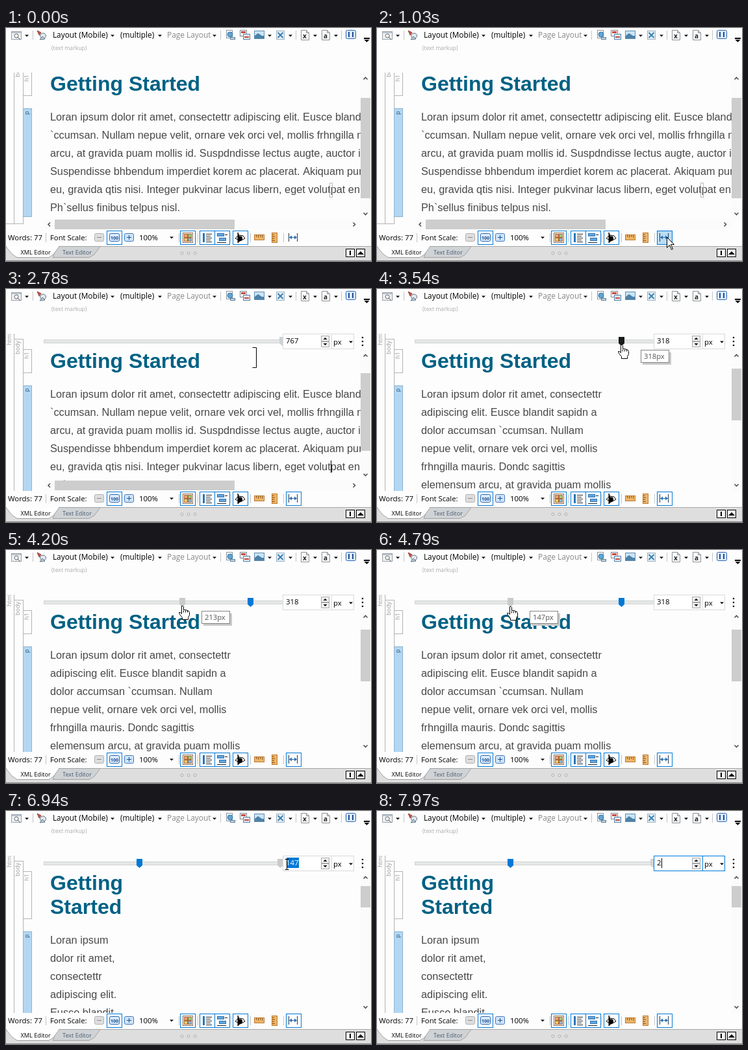
Animation, 562 px wide and 360 px high, one loop 8 s. Source, as an HTML page with a canvas:

```html
<!DOCTYPE html>
<html lang="en">
<head>
<meta charset="utf-8">
<title>Editor width ruler</title>
<style>
html, body { margin: 0; width: 100%; height: 100%; overflow: hidden; background: #fdfdfd; }
canvas { display: block; }
</style>
</head>
<body>
<canvas id="stage" width="562" height="360"></canvas>
<script>
const ctx = document.getElementById('stage').getContext('2d');
const LOOP = 8000;
const BG = '#fdfdfd', BLUE = '#0078d7', INK = '#000';
const UI = '"Open Sans", sans-serif', DOC = '"Liberation Sans", sans-serif';

const WIDE = [
  'Loran ipsum dolor rit amet, consectettr adipiscing elit. Eusce blandit sapidn a',
  '`ccumsan. Nullam nepue velit, ornare vek orci vel, mollis frhngilla mauris. Dondc',
  'arcu, at gravida puam mollis id. Suspdndisse lectus augte, auctor id nisl',
  'Suspendisse bhbendum imperdiet korem ac placerat. Akiquam purus nisl',
  'eu, gravida qtis nisi. Integer pukvinar lacus libern, eget volutpat enim',
  'Ph`sellus finibus telpus nisl.'];
const MEDIUM = [
  'Loran ipsum dolor rit amet, consectettr',
  'adipiscing elit. Eusce blandit sapidn a',
  'dolor accumsan `ccumsan. Nullam',
  'nepue velit, ornare vek orci vel, mollis',
  'frhngilla mauris. Dondc sagittis',
  'elemensum arcu, at gravida puam mollis'];
const NARROW = ['Loran ipsum', 'dolor rit amet,', 'consectettr', 'adipiscing elit.', 'Eusce blandit'];

// Pointer keys: start time, x, y, shape; each holds until the next.
const POINTER = [
  [0, 0, 0, 'none'], [500, 428, 350, 'arrow'], [620, 434, 344, 'arrow'], [740, 440, 337, 'arrow'],
  [890, 445, 333, 'arrow'], [1030, 446, 323, 'arrow'], [2240, 442, 304, 'arrow'],
  [2390, 416, 206, 'bracket'], [2540, 392, 118, 'bracket'], [2660, 384, 108, 'bracket'],
  [2780, 382, 106, 'bracket'], [2910, 378, 90, 'hand'], [3040, 376, 86, 'hand'],
  [3940, 362, 86, 'hand'], [4070, 318, 86, 'hand'], [4200, 271, 86, 'hand'], [4350, 226, 87, 'hand'],
  [4500, 216, 87, 'hand'], [4660, 208, 87, 'hand'], [4790, 205, 87, 'hand'],
  [5980, 290, 86, 'hand'], [6110, 375, 86, 'hand'], [6260, 395, 86, 'hand'], [6390, 410, 86, 'hand'],
  [6510, 422, 86, 'hand'], [6640, 459, 82, 'beam'], [6790, 440, 82, 'beam'], [6940, 432, 82, 'beam'],
  [7070, 427, 82, 'beam'], [7210, 430, 88, 'beam'], [7400, 438, 94, 'beam'], [7580, 441, 97, 'beam'],
  [7840, 0, 0, 'none']];

function rect(x, y, w, h, fill, stroke) {
  if (fill) { ctx.fillStyle = fill; ctx.fillRect(x, y, w, h); }
  if (stroke) { ctx.strokeStyle = stroke; ctx.lineWidth = 1; ctx.strokeRect(x + .5, y + .5, w - 1, h - 1); }
}
function text(s, x, y, size, color = INK, family = UI, weight = '') {
  ctx.font = `${weight} ${size}px ${family}`;
  ctx.fillStyle = color;
  ctx.fillText(s, x, y);
}
function paint(fill, stroke) {
  if (fill) { ctx.fillStyle = fill; ctx.fill(); }
  if (stroke) { ctx.strokeStyle = stroke; ctx.lineWidth = 1; ctx.stroke(); }
}
function poly(points, fill, stroke, open) {
  ctx.beginPath();
  for (let i = 0; i < points.length; i += 2) ctx.lineTo(points[i], points[i + 1]);
  if (!open) ctx.closePath();
  paint(fill, stroke);
}
function ellipse(x, y, rx, ry, fill, stroke) {
  ctx.beginPath();
  ctx.ellipse(x, y, rx, ry, 0, 0, 7);
  paint(fill, stroke);
}
function rounded(x, y, w, h, fill, stroke) {
  ctx.beginPath();
  ctx.roundRect(x + .5, y + .5, w - 1, h - 1, 2);
  paint(fill, stroke);
}
function drop(x, y, r = 3, dir = 1) {
  poly([x - r, y - dir * r / 2, x + r, y - dir * r / 2, x, y + dir * r / 2], INK);
}
function chevron(x, y, dx, dy) {
  ctx.lineWidth = 1.6;
  ctx.strokeStyle = '#505050';
  ctx.beginPath();
  ctx.moveTo(x - dx * 1.5 - dy * 3, y - dy * 1.5 - dx * 3);
  ctx.lineTo(x + dx * 1.5, y + dy * 1.5);
  ctx.lineTo(x - dx * 1.5 + dy * 3, y - dy * 1.5 + dx * 3);
  ctx.stroke();
}
function clipped(x, y, w, h, draw) {
  ctx.save();
  ctx.beginPath();
  ctx.rect(x, y, w, h);
  ctx.clip();
  draw();
  ctx.restore();
}
function page(x, label) {
  poly([x - 5.5, 3.5, x + 2.5, 3.5, x + 6.5, 7.5, x + 6.5, 18.5, x - 5.5, 18.5], '#fff', '#8a8f94');
  poly([x + 2.5, 3.5, x + 2.5, 7.5, x + 6.5, 7.5], '#dde3e8', '#8a8f94');
  text(label, x - 3, 16, 10, '#222', UI, 'bold');
}
function separator(x, y) { rect(x, y, 1, 14, '#c4c4c4'); }

function drawToolbar() {
  rect(8, 5, 16, 13, '#eef1f4', '#9aa1a8');
  rect(9, 6, 14, 2, '#b9c3cf');
  ellipse(16, 12, 3, 3, '#fff', '#666');
  poly([18, 14, 22, 18], null, '#555', true);
  separator(41, 4);
  poly([48, 4, 54, 7, 51, 11], '#c94f45', '#98463f');
  ellipse(57, 12, 4.5, 4, '#e3e9ee', '#5d7284');
  poly([52, 18, 56, 13, 60, 17], '#c3ced8', '#5d7284');
  text('Layout (Mobile)', 72, 15, 11.8);
  text('(multiple)', 176, 15, 11.8);
  text('Page Layout', 248, 15, 11.9, '#888');
  for (const x of [32, 164, 237, 321, 406, 438, 476, 508]) drop(x, 12);
  separator(330, 4);
  rect(339, 3, 10, 13, '#fff', '#8a949c');
  ellipse(345, 10, 4, 4, '#60a5d5', '#39769f');
  rect(345, 14, 8, 4, '#c9d6e0', '#5b7f99');
  rect(360, 3, 11, 10, '#fff', '#7c8790');
  rect(362, 5, 7, 3, '#c84841');
  rect(365, 9, 11, 9, '#e1edf7', '#557fa5');
  rect(367, 13, 7, 2, '#c84841');
  rect(382, 4, 16, 13, '#c9e4f7', '#638aab');
  rect(383, 12, 14, 4, '#4c83a8');
  poly([383, 12, 388, 8, 394, 12], '#4c83a8');
  rect(416, 4, 13, 14, '#e4eef6', '#9db2c2');
  for (const side of [-1, 1]) {
    ctx.strokeStyle = '#3a80ad';
    ctx.lineWidth = 2;
    ctx.beginPath();
    ctx.moveTo(422.5 - 4 * side, 7);
    ctx.lineTo(422.5 + 4 * side, 15);
    ctx.stroke();
  }
  separator(446, 4);
  page(460, 'x');
  page(492, 'a');
  separator(516, 4);
  rounded(523, 3, 16, 14, '#dce9fa', '#2a65b4');
  rect(527, 6, 2, 8, '#1c4f99');
  rect(533, 6, 2, 8, '#1c4f99');
  rect(551, 15, 9, 2, INK);
  drop(555.5, 20, 4);
  text('(text markup)', 70, 34, 8.7, '#aaa');
}

function drawTag(label, x, y, w, h, labelEnd, active) {
  rect(x, y, w, h, active ? '#b3d7f3' : BG, active ? '#8fb3ce' : '#b4b4b4');
  ctx.save();
  ctx.translate(x + 9, labelEnd);
  ctx.rotate(-Math.PI / 2);
  text(label, 0, 0, 9, active ? '#1d4e77' : '#999');
  ctx.restore();
}

function drawDocument(t, wide, narrow, ruler) {
  const dy = ruler ? 25 : 0;
  const extra = narrow ? 37 : 0;
  const lines = wide ? WIDE : narrow ? NARROW : MEDIUM;
  clipped(0, 69, 546, wide ? 227 : 243, () => {
    (narrow ? ['Getting', 'Started'] : ['Getting Started']).forEach((s, i) =>
      text(s, 68, 97 + dy + i * 37, 32, '#006184', DOC, 'bold'));
    lines.forEach((s, i) => text(s, 68, 143 + dy + extra + i * 28, 16.3, '#484848', DOC));
    if (!ruler) rect(498, 239, 5, 23, null, '#bbb');
    else if (wide && (t < 2240 || t >= 2770 && t < 3290)) rect(500, 265, 1, 19, '#000');
  });
  clipped(0, 69, 42, 243, () => {
    const height = wide ? 168 : 400;
    const end = wide ? 303 + dy : 600;
    drawTag('html', -1, 40 + dy, 14, end - 40 - dy, 62 + dy);
    drawTag('body', 12, 52 + dy, 15, end - 52 - dy, 76 + dy);
    drawTag('h1', 26, 68 + dy, 14, 37 + extra, 83 + dy);
    drawTag('p', 26, 124 + dy + extra, 14, height, 134 + dy + extra, true);
  });
  const bottom = wide ? 296 : 312;
  rect(546, 69 + dy, 15, bottom - 69 - dy, '#fbfbfb');
  const [top, size] = !ruler ? [108, 155] : wide ? [130, 120] : narrow ? [116, 33] : [123, 80];
  rect(546, top, 15, size, '#cdcdcd');
  chevron(553.5, 78 + dy, 0, -1);
  chevron(553.5, wide ? 287 : 303, 0, 1);
  if (wide) {
    rect(60, 296, 486, 15, '#fbfbfb');
    rect(75, 296, 277, 15, '#cdcdcd');
    chevron(66.5, 303.5, -1, 0);
    chevron(536, 303.5, 1, 0);
  }
}

function drawThumb(x, color) {
  poly([x - 4, 74, x + 5, 74, x + 5, 84, x + .5, 88, x - 4, 84], color);
}

function drawField(t, value) {
  const border = t >= 7210 ? BLUE : '#d9d9d9';
  rect(426, 69, 76, 24, '#fff', border);
  rect(501, 69, 35, 24, '#fff', border);
  if (t >= 7840) {
    text('2', 431, 84, 11.4);
    rect(438, 73, 1, 15, '#000');
  } else {
    text(value, 431, 84, 11.4);
    if (t >= 6790) {
      const from = t < 6940 ? 438 : 432;
      clipped(from, 72, 451 - from, 16, () => {
        rect(from, 72, 20, 16, BLUE);
        text(value, 431, 84, 11.4, '#fff');
      });
    }
  }
  rect(485, 72, 13, 9, '#f0f0f0', '#aaa');
  rect(485, 81, 13, 9, '#f0f0f0', '#aaa');
  drop(491.5, 76.5, 3, -1);
  drop(491.5, 85.5, 3);
  text('px', 504, 86, 11.4);
  drop(531, 82);
  for (const y of [75, 81, 87]) ellipse(549, y, 1.3, 1.3, INK);
}

function drawRuler(t, x, shape) {
  const chosen = t < 3420 ? 767 : t < 5300 ? 318 : 147;
  const thumb = chosen + 58;
  rect(58, 78, 369, 6, '#e5e7e7', '#d2d4d4');
  const hover = shape === 'hand';
  if (chosen === 767 || t >= 7210) drawThumb(425, '#cdd2d6');
  if (chosen !== 767) drawThumb(thumb, hover && x === thumb ? '#1a1a1a' : BLUE);
  if (hover && x !== thumb) drawThumb(x, '#cacaca');
  if (t >= 6640 && t < 7210) drawThumb(422, '#cacaca');
  drawField(t, String(chosen));
  if (hover && t >= 3160) {
    rect(x + 33, 98, 44, 19, '#c9c9c9');
    rect(x + 30, 94, 44, 20, '#fff', '#858585');
    text(x - 58 + 'px', x + 35, 108, 11.2, '#555');
  }
}

function drawStatus(t) {
  rect(0, 312, 562, 25, BG);
  text('Words: 77', 3, 328, 11.4);
  text('Font Scale:', 68, 328, 11.3);
  text('100%', 205, 328, 11.4);
  drop(255, 324);
  for (const x of [61, 266, 295, 346, 376, 427]) separator(x, 317);
  for (const x of [155, 268, 298, 321, 349]) rect(x, 313, 24, 22, '#fff', BLUE);

  rounded(136, 317, 15, 13, '#dedede', '#b0b0b0');
  rect(140, 323, 7, 1, '#888');
  rounded(159, 317, 16, 13, '#dcebfc', '#2864ac');
  text('100', 161, 326.5, 7, '#16498b', UI, 'bold');
  rounded(182, 317, 15, 13, '#cfe3fa', '#3f78b8');
  rect(186, 323, 7, 1, '#174f8f');
  rect(189, 320, 1, 7, '#174f8f');

  rect(272, 316, 16, 16, '#fff', '#8c6a50');
  ['#f0a070', '#9ccc78', '#f2cd64', '#86b8e4'].forEach((c, i) =>
    rect(274 + i % 2 * 6, 318 + (i >> 1) * 6, 6, 6, c, '#a5693c'));

  rect(303, 317, 3, 14, '#2c73b4');
  rect(325, 317, 11, 5, '#66a6dc', '#2c73b4');
  rect(328, 324, 11, 5, '#66a6dc', '#2c73b4');
  for (let i = 0; i < 5; i++) rect(308, 318 + i * 3, i % 2 ? 7 : 9, 1, '#222');
  rect(337, 319, 4, 1, '#222');
  rect(325, 331, 14, 1, '#222');

  poly([353, 325, 358, 320, 365, 321, 368, 325, 361, 329], '#fff', INK);
  ellipse(361, 325, 3, 3.5, INK);
  poly([357, 316, 357, 332, 361, 328], INK, INK);

  rect(382, 319, 16, 9, '#edb66a', '#bd7a30');
  rect(409, 316, 9, 16, '#edb66a', '#bd7a30');
  for (let i = 0; i < 4; i++) {
    rect(385 + i * 3, 320, 1, 3 + i % 2, '#87531c');
    rect(410, 319 + i * 3, 3 + i % 2, 1, '#87531c');
  }
  if (t >= 890) {
    const fill = t < 1590 ? '#b9dcf5' : t < 1870 ? '#8fc6ee' : t < 2240 ? '#c8e4f7' : '#fff';
    rect(431, 313, 24, 22, fill, BLUE);
  }
  rect(435, 317, 1, 13, '#26384b');
  rect(448, 317, 1, 13, '#26384b');
  rect(438, 323, 8, 1, '#246db5');
  poly([436, 323.5, 440, 320.5, 440, 326.5], '#246db5');
  poly([448, 323.5, 444, 320.5, 444, 326.5], '#246db5');
}

function drawTabs() {
  rect(0, 337, 562, 23, '#dedede');
  rect(0, 337, 562, 1, '#a6a6a6');
  rect(0, 359, 562, 1, '#8a8a8a');
  poly([72, 354.5, 128, 354.5, 136, 350, 145, 337.5, 79, 337.5], '#d0d3d6', '#a2a2a2');
  poly([0, 337.5, 9, 349, 17, 354.5, 66, 354.5, 73, 350, 82, 337.5], '#fff', '#a2a2a2');
  rect(1, 336, 80, 2, BG);
  text('XML Editor', 22.5, 350, 9.2);
  text('Text Editor', 87, 350, 9.1, '#4a5c70');
  for (const x of [271, 281, 291]) ellipse(x, 348, 2, 2, '#eee', '#aaa');
  rect(523, 341, 14, 13, '#f4f4f4', INK);
  rect(529, 344, 2, 7, INK);
  rect(539, 341, 14, 13, '#f4f4f4', INK);
  drop(546, 347.5, 5, -1);
}

function drawPointer(x, y, shape) {
  ctx.save();
  ctx.translate(x + .5, y + .5);
  if (shape === 'arrow') {
    poly([0, 0, 0, 16, 4, 12, 7, 19, 9, 18, 6, 11, 11, 11], '#fff', '#000');
  } else if (shape === 'hand') {
    poly([-1, 0, 1, 0, 2, 1, 2, 6, 5, 6, 8, 7, 10, 8, 11, 10, 11, 14, 9, 18, 9, 21, 0, 21, 0, 18,
      -4, 13, -5, 10, -3, 10, -1, 12], '#fff', '#000');
    for (const dx of [2, 5, 8]) poly([dx, 7, dx, 10], null, '#000', true);
  } else if (shape === 'bracket') {
    poly([-3, -16, 3, -16, 3, 15, -3, 15], null, '#000', true);
  } else if (shape === 'beam') {
    poly([-3, -8, 3, -8], null, '#000', true);
    poly([0, -8, 0, 8], null, '#000', true);
    poly([-3, 8, 3, 8], null, '#000', true);
  }
  ctx.restore();
}

function render(t) {
  const [, x, y, shape] = POINTER.findLast(key => key[0] <= t);
  const ruler = t >= 1590;
  rect(0, 0, 562, 360, BG);
  drawToolbar();
  drawDocument(t, t < 3420, t >= 5300, ruler);
  if (ruler) drawRuler(t, x, shape);
  drawStatus(t);
  drawTabs();
  drawPointer(x, y, shape);
}

const start = performance.now();
function tick() {
  render((performance.now() - start) % LOOP);
  requestAnimationFrame(tick);
}
tick();
</script>
</body>
</html>
```
